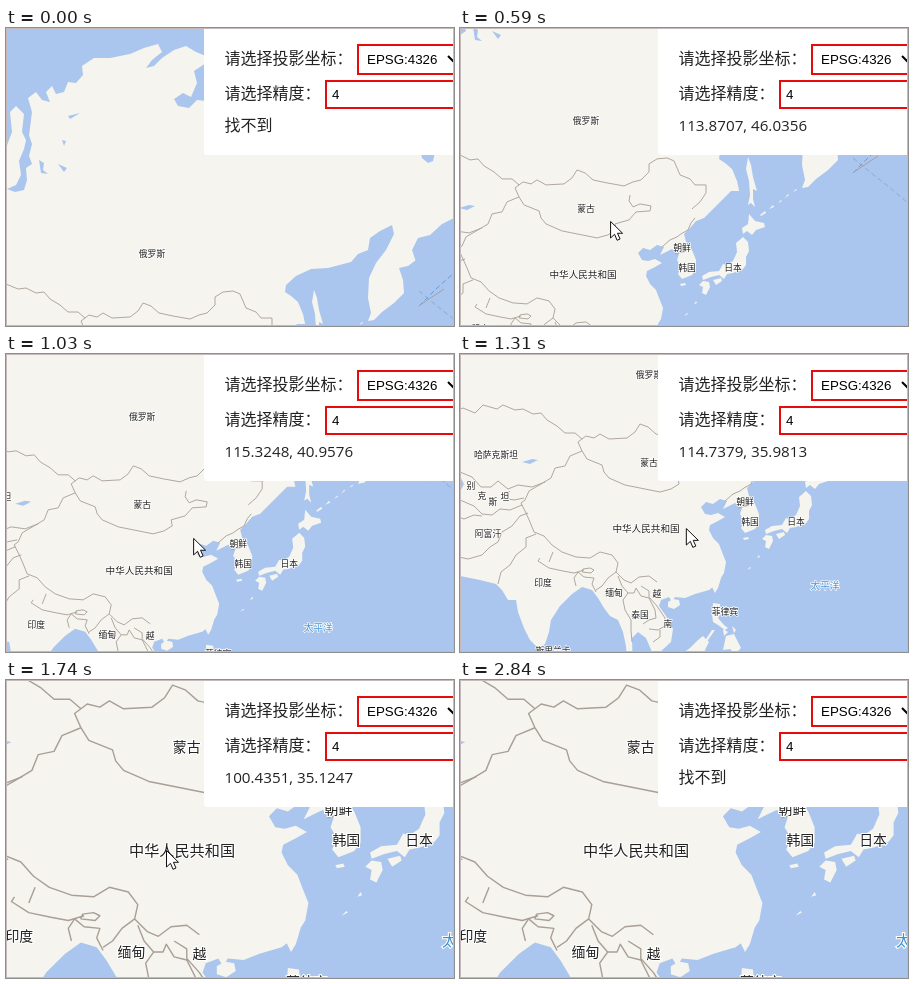
These frames come from a looping animation (448 by 298 pixels, 3.22 s). An HTML page:

```html
<!DOCTYPE html>
<html lang="zh">
<meta charset="utf-8">
<style>
html, body { margin: 0; width: 100%; height: 100%; overflow: hidden; background: #f5f4ee }
svg { display: block }
text { font-family: "Noto Sans CJK SC", "Noto Sans CJK", sans-serif }
.water { fill: #aac6ee }
.land { fill: #f5f4ee }
.border { fill: none; stroke: #a99f96; stroke-width: .9; stroke-linejoin: round }
#labels text { font-size: 8.8px; font-weight: 500; text-anchor: middle; fill: #222; stroke: #fff; stroke-width: 1.4; paint-order: stroke }
#labels .sea { fill: #3f8fd0 }
#panel text { font-size: 16px; fill: #222 }
#panel .field { font: 13.33px "Liberation Sans", Arial, sans-serif; fill: #000 }
#panel .coords { font: 15.2px "Open Sans", sans-serif }
.box { fill: #fff; stroke: #e60c0c; stroke-width: 2 }
</style>
<svg width="448" height="298" viewBox="0 0 448 298">
  <g id="map">
    <!-- Arctic coast, Okhotsk and Bering seas -->
    <g class="water" transform="translate(-20 -133)">
      <path d="M-60 -5H200V28L190 24 180 18 168 22 156 30 148 38 140 40 146 32 156 24 152 16 138 20 124 26 104 30 88 30 76 38 77 47 70 55 62 54 58 64 50 66 46 58 40 64 44 74 36 72 30 64 22 70 26 84 24 100 22 116 16 104 18 86 10 78 4 84 6 104 0 120 -60 130Z"/>
      <path d="M168 71l9-6 8 4 6-14-3-12 12-8v38l-9-1-8 8-11-2zM62 88l12-3-10 6zM56 112l4 1-2 5z"/>
      <path d="M22 104l4 12-3 12 3 8-6 4 1 12-3 10-9 2-8-3 9-4 5-10-2-14 5-12zM33 132l5 3-1 7 5 4-7-1zM52 136l9 4-3 4z"/>
      <path d="M414 120h16l-3 13-5 2-6-5z"/>
      <path d="M300 300L297 286 292 274 285 268 279 264 280 257 290 248 305 241 322 240 345 234 352 226 362 222 364 210 374 203 386 197 388 206 380 222 370 235 363 250 362 270 365 285 362 293 368 292 376 284 388 275 398 265 397 252 393 240 402 238 410 232 412 240 406 222 412 210 424 207 436 196 452 188 500 180V300Z"/>
    </g>
    <!-- Pacific coast from the Tatar Strait to Vietnam -->
    <path class="water" d="M271 163L262 172 252 182 244 190 236 193 230 200 224 206 226 214 232 222 236 232 236 242 232 247 222 251 218 246 221 239 217 232 219 226 212 221 206 224 200 227 204 219 197 217 190 222 183 220 178 225 182 232 188 233 195 231 202 235 195 239 187 243 186 248 190 256 196 262 199 270 203 280 201 291 194 302 186 308 172 312 162 316 152 315 149 320 146 315 138 318 136 324 143 334 150 347 148 360 137 370V390H500V164Z"/>
    <g class="water" transform="translate(-63 72)">
      <path d="M-60 218L0 222 20 226 36 230 42 236 48 246 56 246 58 258 64 274 70 286 78 294 85 290 89 278 91 266 100 252 112 240 122 233 132 236 138 244 144 254 150 262 158 266 163 278 166 292 168 320H-60Z"/>
      <path d="M173 320L172 284 178 278 186 284 192 298 194 320ZM-60 120L0 122 4 130 0 138-60 150ZM62 108l10-3 6 1-8 4z"/>
    </g>
    <g class="land">
      <path d="M288 129l3 8 2 12 4 14-4-2 0 10 2 8-4-4-3 2 2-10-1-14-3-12z"/>
      <path d="M289 186l6 7 9 2 1 4-9 3-4 5-5-4-4 3-1-6 6-4z"/>
      <path d="M283 209l5 5 1 9-3 6 0 8-3 4-5 2-5 2-6 1-3 5-5-4-8 2-8 3-1-4 7-4 10-1 4-7 4 1 6-4 4-9-1-9z"/>
      <path d="M243 253l6 1 1 5-4 8-4-2 1-6-4-2zM253 252l8-2 1 3-6 4zM220 256l5-1 1 2-5 1z"/>
      <path d="M300 187l5-4 1 2-5 3zM309 181l4-4 1 2zM318 175l3-3 1 1zM325 170l3-4 1 1zM333 164l3-3 1 1zM234 276l2-3 1 2zM224 288l3-3 1 1z"/>
      <g transform="translate(-63 72)">
        <path d="M258 221l3 3-3 10-3 5-3-6 3-8zM208 248l5-3 6 1 1 5-6 4-6-2z"/>
        <path d="M253 249l7 1 1 9-3 5 6 7 4 3-3 2-7-5-5-3-1-8zM266 282l8-2 3 6 4 8-6 6-5-5-7 1zM263 275l5 3-4 4zM272 272l4 4-2 3zM255 276l-9 13-2-1 8-12z"/>
        <path d="M222 300l8-6 8-8 5-4 6 6-4 8 1 24h-26zM86 291l5 3 3 7-4 5-5-5z"/>
      </g>
    </g>
    <g class="border">
      <path d="M-70 130l10-4 12 5 8-8 14 4 6-4 12 5 8-1 10 5 8-1 6 7 10 6 8 7 10 0 7 6M59 169l-4-9 8-6 8 2 6-4 9 5 18-1 8-6 5-8 8 3 8 7 14 3 17 3 9-4 8-2 8-8 0-8 8-5 10-1 7 3 6 14 10 4 5 6 11 0 0 8-6 9-8 7"/>
      <path d="M59 169l5 8 15 6 2 7 5 6 16 7 20 4 15 3 11-3 8-5-1-6 14-4 7-8 14-1 1-5-11-2-7 3-4-6 1-6"/>
      <path d="M59 169l-12 5-5 10-10 2-4 10-10 6-12 7-4 9-4 3 5 10 4 9 4 10 10 4 8 9 10 7 14 5 14 1 10-6 12 3 6 8-2 9 8 8 7 3 8-6 10-1 8 6"/>
      <path d="M235 190l-4 5-3 7-7 4-4 3-7 3-8 7M215 226l12-3M26 280l4-10M17 276l-2 3 11 7 14 3 11 2 10-3M60 287l7-1 4 2-3 3-9-1z"/>
      <g transform="translate(-63 72)">
        <path d="M0 118l12 5 9 10 10 0 7-6 10 8 10-4 14 2 13-5M50 137l-8 7 12 2 10-2M0 146l14 6 8 8 10 1 8-6 10 1 12-5"/>
        <path d="M-10 201l18 4 14-4 8-8 8-5 4-10 10-6 8-10 8-3M76 180l-10 4 0 9-10 8-6 10-9 7-3 12M-10 160l14 5 10-4 8 1"/>
        <path d="M116 232l-2-8 4-6 6 5 10 1-2 6 4 8M156 218l-8 6-6 8-6 4M158 222l4 10 6 7-5 7 2 10 6 10 0 10 1 12M168 239l6 0 2-5 5 8 8 2 6 12 1 8-7 2-6 4M181 232l8 5 0 6 8 9 8 12 0 8-7 4-9-1M200 276l0 7-7 5"/>
      </g>
    </g>
    <g fill="none" stroke-dasharray="5 3">
      <path d="M393 145l18-18 18-16" stroke="#5d9be0"/>
      <path d="M393 130l18 15 18 14 20 17" stroke="#8fa9c4"/>
      <path d="M394 144l24-16" stroke="#a99f96" stroke-dasharray="none"/>
    </g>
    <g id="labels"></g>
  </g>
  <g id="panel">
    <path d="M198 0H448V127H201q-3 0-3-3z" fill="#fff"/>
    <rect class="box" x="352" y="17" width="120" height="29"/>
    <rect class="box" x="320" y="53" width="150" height="27"/>
    <text x="218.500" y="36">请选择投影坐标：</text>
    <text x="218.500" y="71">请选择精度：</text>
    <text class="field" x="361" y="36">EPSG:4326</text>
    <text class="field" x="326" y="71">4</text>
    <path d="M442 28l5 5 5-5" fill="none" stroke="#000" stroke-width="2"/>
    <text id="readout" x="218.500" y="103"></text>
  </g>
  <path id="cursor" d="M.5 .5V17l4-3.700 2.500 6 3-1.300-2.600-5.700H12.500z" fill="#fff" stroke="#111"/>
  <rect x=".5" y=".5" width="447" height="297" fill="none" stroke="#c6b9b9"/>
</svg>
<script>
const $ = id => document.getElementById(id);

const labels = [
  ['俄罗斯', 126, 93], ['蒙古', 126, 181], ['中华人民共和国', 123, 247, 9.6],
  ['朝鲜', 222, 220], ['韩国', 227, 240], ['日本', 273, 240],
  ['哈萨克斯坦', -27, 173], ['别', -52, 204], ['克', -41, 214], ['斯', -30, 220], ['坦', -18, 215],
  ['阿富汗', -35, 252], ['印度', 20, 301], ['缅甸', 91, 311], ['泰国', 117, 333],
  ['越', 134, 312], ['南', 145, 342], ['菲律宾', 202, 330], ['斯里兰卡', 30, 369],
  ['太平洋', 302, 304, 9.6, 'sea']
];
$('labels').innerHTML = labels.map(([name, x, y, size = 8.8, kind = '']) =>
  `<text class="${kind}" x="${x}" y="${y + 3.3}" style="font-size:${size}px">${name}</text>`).join('');

const LOOP = 3220, ENTER = 70, LEAVE = 2800;
// time, x, y, scale
const view = [
  [30, 20, 133, 1], [540, 0, 0, 1], [590, 0, 0, 1], [1030, 10, -30, 1],
  [1310, 63, -72, 1], [1430, 63, -72, 1], [1740, -18.3, -219.3, 1.58]
];
// time, x, y
const pointer = [
  [70, 168, 285], [540, 150, 193], [590, 150, 193], [1030, 187, 184], [1310, 226, 174],
  [1450, 204, 181], [1740, 160, 170], [1790, 160, 170], [2200, 112, 175],
  [2330, 184, 148], [2430, 184, 148], [2690, 250, 264], [2800, 256, 298]
];
// time, longitude, latitude
const place = [
  [70, 112.9053, 51.2264], [590, 113.8674, 46.0471], [1030, 115.3268, 40.9754],
  [1310, 114.7712, 35.9833], [1740, 100.4351, 35.1247], [1790, 100.4351, 35.1247],
  [2200, 94.9736, 34.4872], [2330, 103.1672, 37.9102], [2430, 103.1672, 37.9102],
  [2690, 110.6785, 23.9418], [2800, 111.3613, 19.6027]
];

function sample(keys, t) {
  const i = keys.findIndex(k => k[0] > t);
  if (i < 0) return keys[keys.length - 1].slice(1);
  if (!i) return keys[0].slice(1);
  const a = keys[i - 1], b = keys[i], p = (t - a[0]) / (b[0] - a[0]);
  return a.slice(1).map((v, j) => v + (b[j + 1] - v) * p);
}

function draw(now) {
  const t = now % LOOP, inside = t >= ENTER && t < LEAVE;
  const [x, y, s] = sample(view, t);
  $('map').setAttribute('transform', `translate(${x} ${y}) scale(${s})`);
  $('cursor').setAttribute('transform', `translate(${sample(pointer, t)})`);
  $('cursor').style.display = inside ? '' : 'none';
  $('readout').textContent = inside ? sample(place, t).map(v => v.toFixed(4)).join(', ') : '找不到';
  $('readout').setAttribute('class', inside ? 'coords' : '');
}

const start = performance.now();
(function tick() {
  draw(performance.now() - start);
  requestAnimationFrame(tick);
})();
</script>
</html>
```
